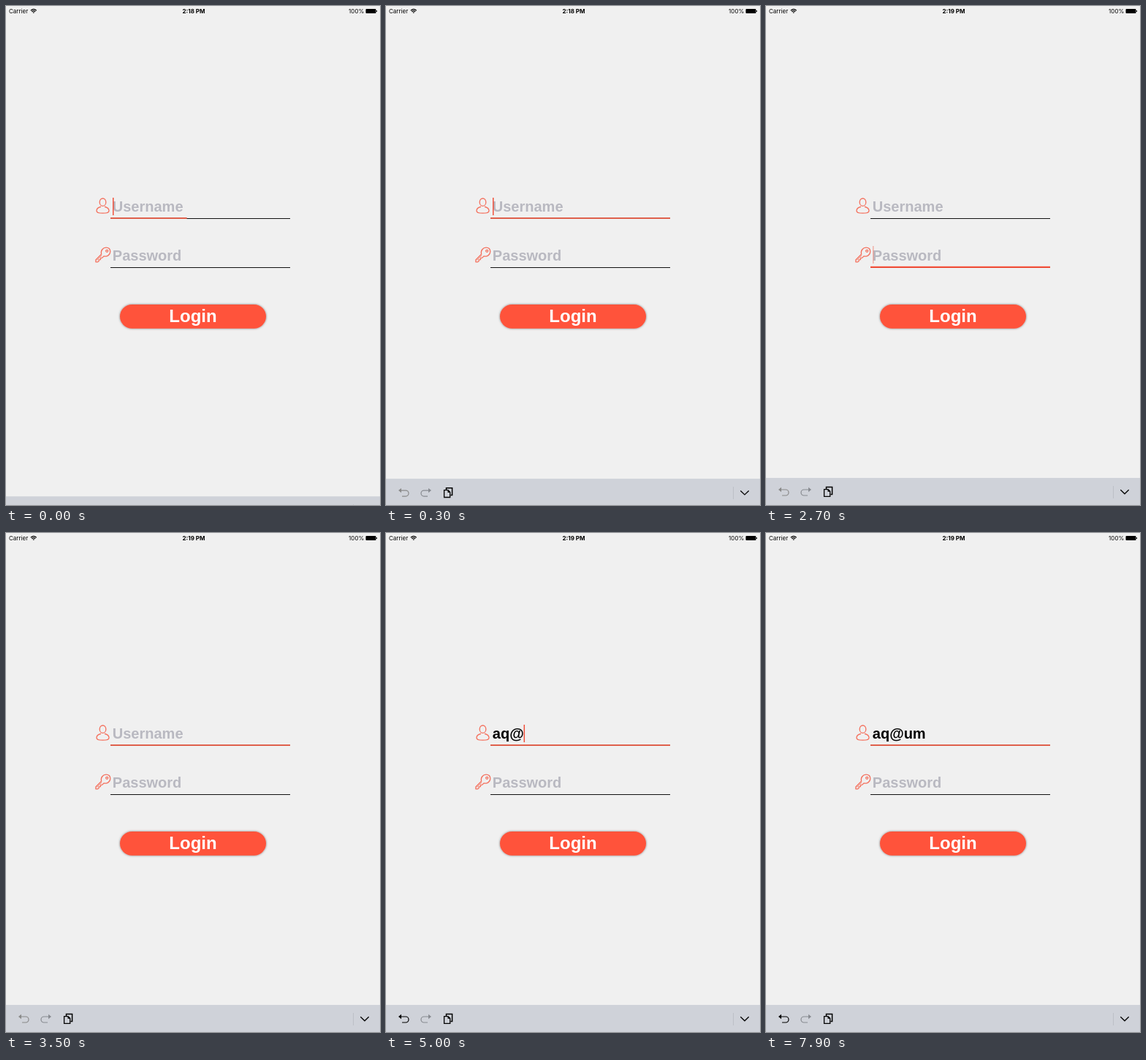
These frames come from a looping animation (512x682 px, 8000 ms). An HTML page:

```html
<!DOCTYPE html>
<html lang="en">
<head>
<meta charset="utf-8">
<title>Login form</title>
<style>
  html, body { margin: 0; width: 100%; height: 100%; overflow: hidden; background: #f0f0f0; }
  svg { display: block; width: 100%; height: 100%; }
  .status { font: 8px Inter, "Open Sans", sans-serif; }
  .field { font: bold 20px "Liberation Sans", Arial, sans-serif; white-space: pre; }
  .login { font: bold 24px "Liberation Sans", Arial, sans-serif; fill: #fff; }
  .icon { fill: none; stroke: #f4705d; stroke-width: 1.3; stroke-linejoin: round; stroke-linecap: round; }
  .hint { fill: #b9b9c1; }
</style>
</head>
<body>
<svg viewBox="0 0 512 682" xmlns="http://www.w3.org/2000/svg">
  <defs>
    <filter id="shadow" x="-10%" y="-30%" width="120%" height="160%">
      <feDropShadow dx="0" dy="0" stdDeviation="1.7" flood-color="#000" flood-opacity=".5"/>
    </filter>
    <g id="turn">
      <path d="M2 3.5H10A4 4 0 0 1 10 11.5H5" fill="none" stroke="currentColor" stroke-width="1.2"/>
      <path d="M0 3.5L4 .3V6.7Z" fill="currentColor"/>
    </g>
  </defs>
  <rect width="512" height="682" fill="#f0f0f0"/>

  <g class="status">
    <text x="4" y="9.8">Carrier</text>
    <text id="clock" x="257" y="9.8" text-anchor="middle" font-weight="700"></text>
    <text x="490.3" y="9.8" text-anchor="end">100%</text>
    <g fill="none" stroke="#000" stroke-width="1.2">
      <path d="M33.9 6.2Q37.8 2.6 41.7 6.2M35.4 7.8Q37.8 5.6 40.2 7.8"/>
      <path d="M36.5 8.7Q37.8 7.7 39.1 8.7L37.8 10.1Z" fill="#000" stroke="none"/>
    </g>
    <rect x="492.5" y="4" width="14" height="6" rx="1"/>
    <rect x="507" y="6" width="1" height="2"/>
  </g>

  <g class="icon">
    <ellipse cx="132.5" cy="268.2" rx="4.3" ry="5.2"/>
    <path d="M129.5 274.5C126 275.4 124 277.6 124 280C124 282 127.5 283.2 132.5 283.2S141 282 141 280C141 277.6 139 275.4 135.5 274.5"/>
    <path d="M130.6 339.2C129.2 334 133 330.2 137 330.2C140.6 330.2 142.7 332.6 142.7 335.7C142.7 340 138.5 343.2 134 341.9L131.6 344.2L129.6 344.4L129.4 346.6L127.2 346.9L127 349L125.2 349.8H122.9V347Z"/>
    <circle cx="138.2" cy="334.8" r="1.5"/>
    <path d="M131 341L124.8 347.4" stroke-width=".8"/>
  </g>

  <path d="M143 290.5H389M143 357.5H389" stroke="#111" stroke-width="1"/>
  <rect id="userLine" x="143" y="289" height="2" fill="#df604c"/>
  <rect id="passLine" x="143" y="355.8" height="2.1" fill="#fb503a"/>
  <text id="user" class="field" x="145.8" y="281"></text>
  <text class="field hint" x="145.8" y="347.5">Password</text>
  <rect id="caret" width="1.5" height="24" fill="#f0523d"/>

  <rect x="156" y="408" width="200" height="32.7" rx="16.35" fill="#ff523b" filter="url(#shadow)"/>
  <text class="login" x="256" y="432" text-anchor="middle">Login</text>

  <g id="bar">
    <rect y="645" width="512" height="60" fill="#cfd2d9"/>
    <use id="undo" href="#turn" x="17" y="657.5"/>
    <use href="#turn" transform="translate(62 657.5) scale(-1 1)" color="#888b91"/>
    <path d="M82.5 660V657.6H90.6V667.5H88.5" fill="none" stroke="#000" stroke-width="1.5"/>
    <path d="M79.6 660.6H85L87.7 663.3V670.4H79.6Z" fill="none" stroke="#000" stroke-width="1.3"/>
    <path d="M84.5 660.5V663.8H87.8Z"/>
    <path d="M475.5 656V673" stroke="#bcbfc6" stroke-width="1"/>
    <path d="M485.3 661.3L491 666.8L496.7 661.3" fill="none" stroke="#000" stroke-width="1.3"/>
  </g>
</svg>
<script>
const LOOP = 8000, STEP = 100, LINE = 246, MOVE = 300;
const $ = id => document.getElementById(id);
const clock = $('clock'), user = $('user'), caret = $('caret'), bar = $('bar'), undo = $('undo');
const userLine = $('userLine'), passLine = $('passLine');

const typed = [[0, ''], [3700, 'a'], [4100, 'aq'], [5000, 'aq@'], [5800, 'aq@u'], [6200, 'aq@um']];
const blink = [
  [0, 1], [500, .65], [600, .25], [700, 0], [1000, .5], [1100, 1], [1500, .65],
  [1600, 1], [2200, .65], [2300, .25], [2400, 0], [2700, .4],
  [2800, 1], [3300, .65], [3400, .25], [3500, 0], [3700, 1],
  [4600, .65], [4700, .25], [4800, 0], [5000, 1], [5500, .65], [5600, .25], [5700, 0],
  [5800, 1], [6800, .4], [6900, 0], [7300, 1], [7800, .4], [7900, 0]
];

const at = (track, t) => track.filter(([start]) => start <= t).pop()[1];
const clamp = x => Math.min(1, Math.max(0, x));
const ease = x => x * x * (3 - 2 * x);
const swipe = (t, start) => ease(clamp((t - start) / MOVE));
const springRest = x => (1 + x) * Math.exp(-x);

function draw(t) {
  const onPassword = t >= 1600 && t < 2800;
  const text = at(typed, t);
  clock.textContent = t < 2600 ? '2:18 PM' : '2:19 PM';

  user.textContent = text || 'Username';
  user.setAttribute('fill', text ? '#000' : '#b9b9c1');
  const advance = text ? user.getComputedTextLength() : 0;
  caret.setAttribute('x', 146 + advance - (text ? .3 : 0));
  caret.setAttribute('y', onPassword ? 328 : 262);
  caret.setAttribute('opacity', at(blink, t));

  const away = swipe(t, 1560), back = swipe(t, 2700);
  userLine.setAttribute('width', LINE * (swipe(t, -135) - away + back));
  passLine.setAttribute('width', LINE * (away - back));

  bar.setAttribute('transform', `translate(0 ${37 * springRest((t + 82) * .014)})`);
  const shade = Math.round(138 * (1 - clamp((t - 3600) / 300)));
  undo.setAttribute('color', `rgb(${shade},${shade},${shade})`);
}

const begin = performance.now();
function tick() {
  const t = (performance.now() - begin) % LOOP;
  draw(Math.floor(t / STEP) * STEP);
  requestAnimationFrame(tick);
}
tick();
</script>
</body>
</html>
```
